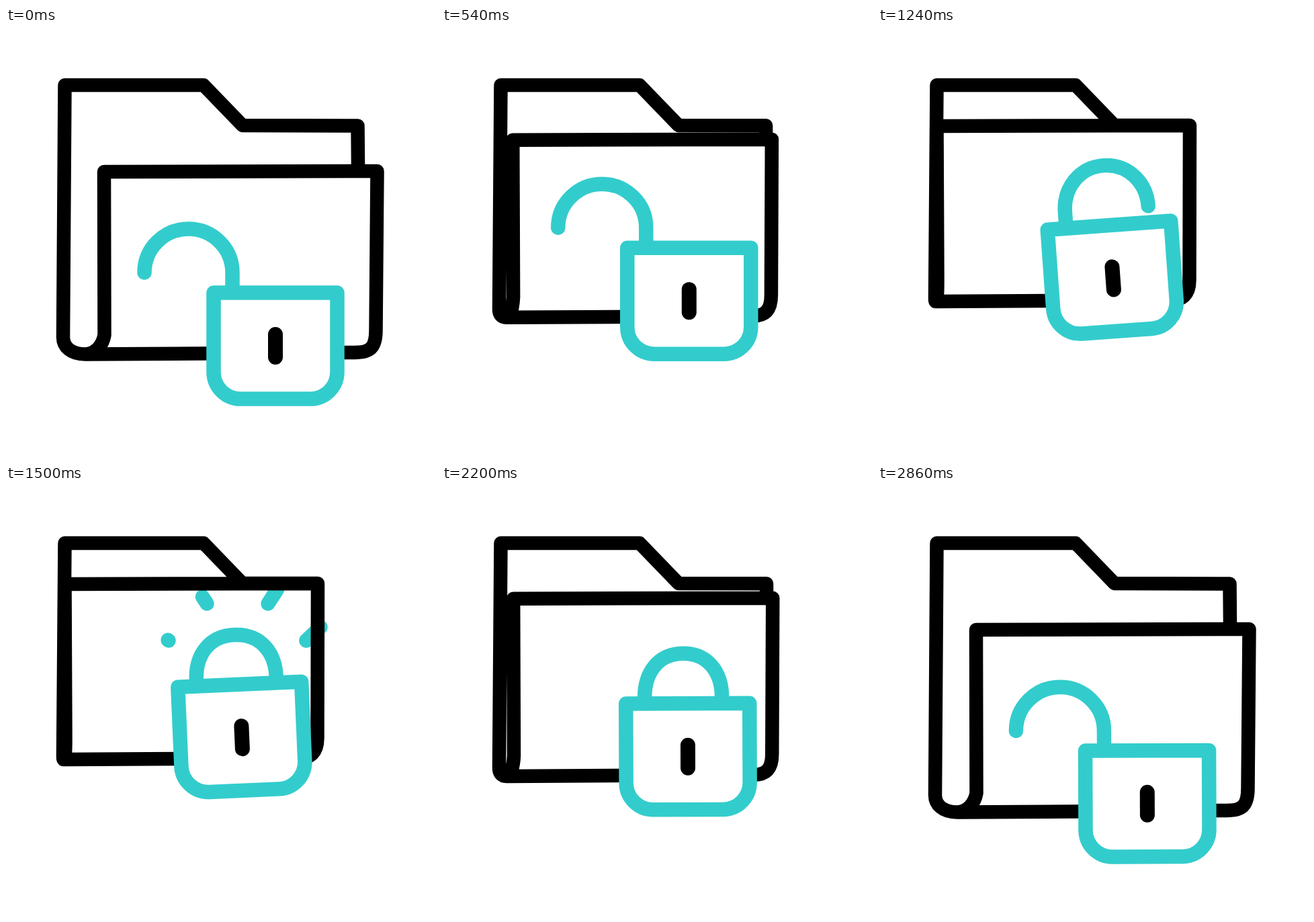
Recreate the animation shown at these times as an HTML page. Size 640 by 640 pixels, loop 3 s.

```html
<!DOCTYPE html>
<html lang="en">
<head>
<meta charset="utf-8">
<title>Folder lock</title>
<style>
  html, body { margin: 0; width: 100%; height: 100%; overflow: hidden; background: #fff; }
  svg { display: block; width: 100vw; height: 100vh; fill: none; stroke-linecap: round; stroke-linejoin: round; }
  #sparks, #shackle, #body { stroke: #3cc; stroke-width: 21.5; }
  #folder { stroke: #000; stroke-width: 20.5; }
  #body { fill: #fff; }
  #keyhole { stroke: #000; stroke-width: 22; }
</style>
</head>
<body>
<svg viewBox="0 0 640 640">
  <g id="sparks"></g>
  <path id="folder"/>
  <g id="lock">
    <path id="shackle"/>
    <path id="body" d="M-92-79H92V39a40 40 0 0 1-40 40H-52a40 40 0 0 1-40-40z"/>
    <path id="keyhole" d="M0-17V17"/>
  </g>
</svg>
<script>
const LOOP = 3000;
const $ = id => document.getElementById(id);
const mix = (a, b, k) => a + (b - a) * k;
const clamp = x => Math.min(1, Math.max(0, x));
const smooth = x => x * x * (3 - 2 * x);

// cubic-bezier(.167, 0, .833, 1), solved by bisection
function soft(x) {
  let lo = 0, hi = 1;
  for (let i = 0; i < 24; i++) {
    const s = (lo + hi) / 2, r = 1 - s;
    if (0.5 * r * r * s + 2.5 * r * s * s + s * s * s < x) lo = s; else hi = s;
  }
  return smooth(lo);
}

// keys: [time, value or list of values]
function track(keys, t, ease = smooth) {
  let i = 0;
  while (i < keys.length - 2 && t >= keys[i + 1][0]) i++;
  const [t0, a] = keys[i], [t1, b] = keys[i + 1];
  const k = ease(clamp((t - t0) / (t1 - t0)));
  return Array.isArray(a) ? a.map((v, j) => mix(v, b[j], k)) : mix(a, b, k);
}

// command, open x, y, closed x, y
const folder = [
  ['M', 524, 205, 464, 150],
  ['L', 523.5, 145.5, 464, 145],
  ['L', 352, 145, 352, 145],
  ['L', 294, 85, 294, 85],
  ['L', 87.5, 85, 87.5, 85],
  ['L', 85, 460, 85, 401],
  ['C', 85, 474, 85, 405],
  [' ', 96, 485.5, 85, 407],
  [' ', 118, 485.5, 86, 407],
  ['C', 133, 485.5, 88, 407],
  [' ', 144, 472, 88.5, 392],
  [' ', 146.5, 457, 88.5, 376],
  ['L', 146, 214, 87.5, 146],
  ['L', 552.5, 213, 464, 145],
  ['L', 550.5, 450, 463.5, 375],
  ['C', 550.5, 477, 463.5, 398],
  [' ', 541, 483, 452, 405],
  [' ', 519, 483, 437, 405],
  ['L', 118, 485.5, 86, 407]
];

// shackle: width from the fixed leg, drop into the body, shoulder fullness
const OPEN = [-131, 0, 0.55], TURNED = [126, 0, 0.55], SHUT = [119, 21, 0.66];
const shackleKeys = [
  [800, OPEN], [1040, TURNED], [1180, TURNED], [1360, SHUT], [2160, SHUT], [2700, OPEN]
];
const closeKeys = [[300, 0], [680, 1], [1860, 1], [2840, 0]];
const liftKeys = [[300, 0], [680, 1], [1860, 1], [2860, 0]];
const tiltKeys = [
  [560, 0], [680, -10], [1180, -10], [1360, 12], [1500, -2.5], [1680, -0.2], [2860, -0.2]
];

// inner x, y, outer x, y, start time
const sparks = [
  [242, 230, 221, 210, 1490],
  [299, 175, 284, 152, 1460],
  [390, 175, 405, 152, 1430],
  [446, 231, 468, 210, 1400]
].map(([x1, y1, x2, y2, start]) => {
  const el = document.createElementNS('http://www.w3.org/2000/svg', 'path');
  $('sparks').append(el);
  return { el, start, at: k => mix(x1, x2, k) + ' ' + mix(y1, y2, k) };
});

function shacklePath([w, drop, full]) {
  const leg = -64, y = drop - 109, top = y - 65, rise = y - 36, mid = leg + w / 2, end = leg + w;
  return `M${leg}-79V${y}C${leg} ${rise} ${mid - full * w / 2} ${top} ${mid} ${top}` +
    `S${end} ${rise} ${end} ${y}`;
}

function draw(t) {
  const shut = track(closeKeys, t, t < 1000 ? smooth : soft);
  $('folder').setAttribute('d', folder.map(([c, x, y, u, v]) =>
    c + mix(x, u, shut) + ' ' + mix(y, v, shut)).join(''));

  const lift = track(liftKeys, t);
  $('lock').setAttribute('transform',
    `translate(${401 - 47.7 * lift} ${473 - 96 * lift}) rotate(${track(tiltKeys, t)} -65 48)`);
  $('shackle').setAttribute('d', shacklePath(track(shackleKeys, t)));

  for (const { el, start, at } of sparks) {
    const head = smooth(clamp((t - start) / 90)), tail = smooth(clamp((t - start - 90) / 90));
    el.style.display = head > 0 && tail < 1 ? '' : 'none';
    el.setAttribute('d', `M${at(tail)}L${at(head)}`);
  }
}

const begin = performance.now();
function tick() {
  draw((performance.now() - begin) % LOOP);
  requestAnimationFrame(tick);
}
tick();
</script>
</body>
</html>
```
